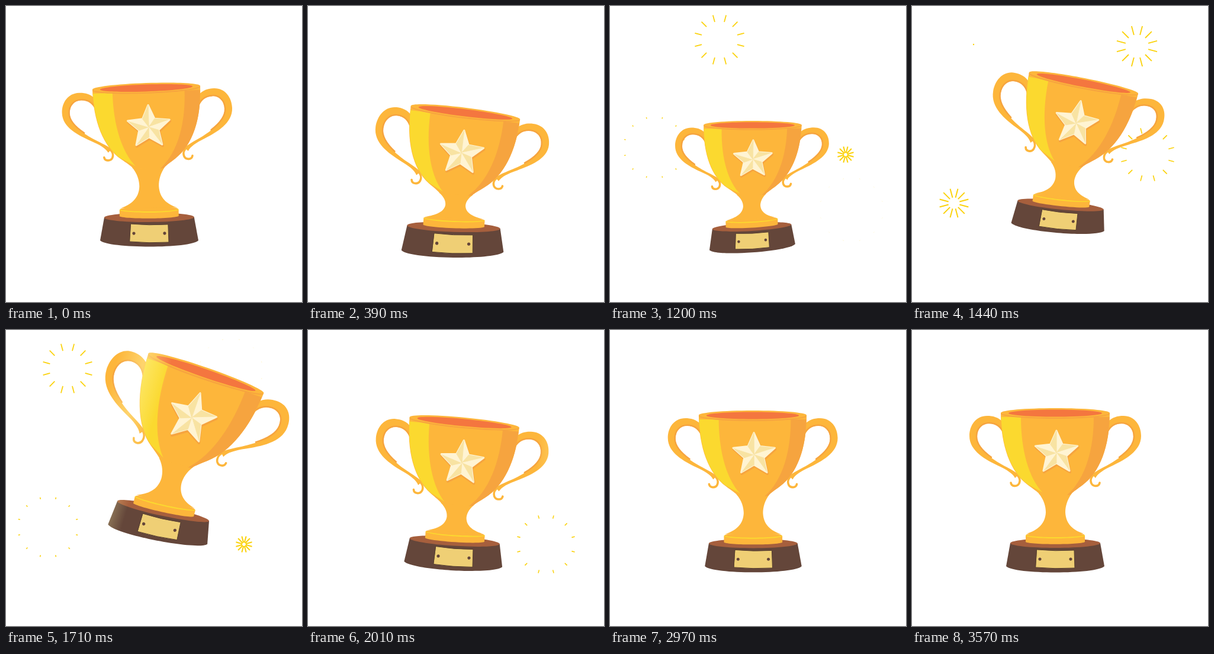
An HTML page with a canvas for the animation above (3.6 s loop, 500 by 500 pixels).

```html
<!DOCTYPE html>
<html lang="en">
<head>
<meta charset="utf-8">
<title>Trophy</title>
<style>
  html, body { margin: 0; width: 100%; height: 100%; overflow: hidden; background: #fff; }
  canvas { display: block; width: 500px; height: 500px; }
</style>
</head>
<body>
<canvas id="stage" width="500" height="500"></canvas>
<script>
const ctx = document.getElementById('stage').getContext('2d');
const LOOP = 3600, STEP = 30, RAD = Math.PI / 180;
const GOLD = '#fdb63b', SHADE = '#f6a43f', YELLOW = '#fbd92f', RED = '#f4763f';
const WOOD = '#64463a', WOOD_TOP = '#a65f3d', PLATE = '#efcf75';
const CREAM = '#fff4d3', CREAM_DARK = '#f8e3a2', SPARK = '#fbd20c';

// time, base x, base y, base angle, base scale, rim x, rim y, rim angle, rim scale
const POSES = [
  [0, 242, 397, 0, 1, 237, 138, -2, .99],
  [120, 241, 397, -1, 1, 231, 135, -4, .99],
  [390, 244, 415, 1, 1.04, 266, 180, 7, 1.01],
  [540, 240, 399, -3, 1, 224, 142, -6, 1],
  [750, 217.5, 350, -8.4, .99, 160, 84, -14.6, 1.055],
  [840, 209, 333, -9, 1, 150, 66, -15, 1.06],
  [1080, 230, 391, -7, .93, 212, 158, -8, .96],
  [1200, 240.5, 408, -4, .875, 241, 201, 0, .9],
  [1440, 246, 374, 5, .95, 290, 130, 11, 1.02],
  [1710, 256, 346, 11.2, 1.03, 338, 73, 19, 1.12],
  [1950, 248, 385, 6, 1, 285, 135, 9, 1.04],
  [2100, 242, 408, 0, 1, 240, 178, 1, .98],
  [2370, 241, 402, -.6, 1, 234.5, 155, -1.9, 1.005],
  [2700, 242, 399, 0, 1, 243, 131, .5, .99],
  [2970, 242, 400, 0, .985, 241, 144, 0, .99],
  [3570, 242, 400, 0, 1, 242, 140, 0, 1]
];

// start time, x, y
const BURSTS = [
  [720, 408, 344], [780, 75, 239], [925, 185, 57], [1130, 398, 251],
  [1235, 380, 68], [1305, 71, 333], [1437, 104, 65], [1640, 402, 362]
];
const BURST_TIME = 500, BURST_RADIUS = 54;
const SHINE = { from: 1620, to: 2040 };

const lerp = (a, b, t) => a + (b - a) * t;

// Monotone cubic interpolation of every pose column
function poseAt(time) {
  const last = POSES.length - 1;
  const i = Math.max(0, POSES.findLastIndex(p => p[0] <= time));
  if (i === last) return POSES[last];
  const rate = (n, c) => (POSES[n + 1][c] - POSES[n][c]) / (POSES[n + 1][0] - POSES[n][0]);
  const slope = (n, c) => {
    if (n === 0 || n === last) return 0;
    const a = rate(n - 1, c), b = rate(n, c);
    return a * b <= 0 ? 0 : 2 * a * b / (a + b);
  };
  const p = POSES[i], q = POSES[i + 1], span = q[0] - p[0], u = (time - p[0]) / span;
  return p.map((v, c) => {
    const d = q[c] - v, m = slope(i, c) * span, n = slope(i + 1, c) * span;
    return v + u * (m + u * (3 * d - 2 * m - n + u * (m + n - 2 * d)));
  });
}

// Bends the upright trophy (x from its axis, y from 140 rim to 400 foot) along a spine
function makeWarp([, bx, by, a0, s0, rx, ry, a1, s1]) {
  const dx = rx - bx, dy = ry - by, len = Math.hypot(dx, dy), tilt = Math.atan2(dx, -dy);
  const tall = 1 + 1.4 * (s1 - 1);
  const low = 53 * s0 / len, high = 1 - 137 * tall / len;
  const bow = -len * (a1 - a0) * RAD / 2;
  const along = y => y > 347 ? (400 - y) * s0 / len
    : y > 277 ? lerp(low, high, (347 - y) / 70)
    : 1 - (y - 140) * tall / len;
  const warp = (x, y) => {
    const t = along(y), a = lerp(a0, a1, t) * RAD, r = x * lerp(s0, s1, t), b = bow * t * (1 - t);
    return [bx + dx * t + b * Math.cos(tilt) + r * Math.cos(a),
            by + dy * t + b * Math.sin(tilt) + r * Math.sin(a)];
  };
  return { warp, tilt, bx, by };
}

const PAIR = /(-?[\d.]+),(-?[\d.]+)/g;
const mirror = d => d.replace(PAIR, (_, x, y) => `${-x},${y}`);

function ellipse(y, rx, ry, x = 0) {
  const k = .5523, a = rx * k, b = ry * k, l = x - rx, r = x + rx;
  return `M${l},${y} C${l},${y - b} ${x - a},${y - ry} ${x},${y - ry} C${x + a},${y - ry} ${r},${y - b} ${r},${y}` +
    ` C${r},${y + b} ${x + a},${y + ry} ${x},${y + ry} C${x - a},${y + ry} ${l},${y + b} ${l},${y} Z`;
}

function starPoint(i, dx = 0, dy = 0) {
  const a = i * 36 * RAD, r = i % 2 ? 17.5 : 37.5;
  return `${(2 + dx + r * Math.sin(a)).toFixed(2)},${(207.5 + dy - r * Math.cos(a)).toFixed(2)}`;
}
const starPath = (dx, dy) =>
  'M' + Array.from({ length: 10 }, (_, i) => starPoint(i, dx, dy)).join(' L') + ' Z';

const HANDLE = 'M-88,156 C-96,147 -106,145 -115,145 C-134,145 -145,161 -145,179 C-145,205 -117,219 -97,229' +
  ' C-82,236 -72,242 -68,250 L-62,244 C-72,236 -84,231 -94,225 C-112,214 -132,200 -132,180' +
  ' C-132,166 -123,158 -112,158 C-100,158 -92,164 -86,180 Z';
const HANDLE_EDGE = 'M-108,215 C-122,205 -133,194 -133,180 C-133,165 -123,157 -112,157 C-100,157 -92,163 -87,174';
const CURL = 'M-72,240 C-62,245 -58,252 -61,259 C-64,265 -74,265 -75,258';
const BODY = 'M-92,140 C-92,195 -76,240 -46,262 C-38,268 -30,273 -26,278 L26,278' +
  ' C30,273 38,268 46,262 C76,240 92,195 92,140 Z';
const LIGHT = 'M-91.5,147 C-90,196 -75,240 -46,261 L-22,274 C-44,250 -58,205 -58,147 Z';
const DARK = 'M65,147 C65,200 52,250 20,279 L26,278 C30,273 38,268 46,262 C76,240 91,196 91.5,147 Z';
const STEM = 'M-28,276 C-19,287 -16,298 -16,308 C-17,328 -30,338 -48,344 L48,344' +
  ' C30,338 18,328 17,308 C17,298 20,287 28,276 Z';
const FOOT = 'M-50,347 L-50,358 C-42,363 42,363 50,358 L50,347 Z';
const BLOCK = 'M-76,360 L-83,399 C-70,413 70,413 83,399 L76,360 Z';
const LABEL = 'M-31,371 Q0,374 32,372 L33,402 Q0,404 -33,401 Z';

function drawTrophy(warp) {
  const shape = d => new Path2D(d.replace(PAIR, (_, x, y) => warp(+x, +y).join(',')));
  const fill = (d, color) => { ctx.fillStyle = color; ctx.fill(shape(d)); };
  const line = (d, color, width) => {
    ctx.strokeStyle = color;
    ctx.lineWidth = width;
    ctx.stroke(shape(d));
  };
  ctx.lineCap = ctx.lineJoin = 'round';

  fill(BLOCK, WOOD);
  fill(ellipse(360, 76, 8), WOOD_TOP);
  fill(LABEL, PLATE);
  line(LABEL, '#57402f', 1);
  for (const x of [-26, 26]) fill(ellipse(387, 2.6, 2.6, x), WOOD);

  fill(FOOT, GOLD);
  fill(ellipse(347, 50, 5), YELLOW);
  fill(ellipse(346, 49, 4), GOLD);
  fill(STEM, GOLD);

  for (const side of [d => d, mirror]) {
    fill(side(HANDLE), GOLD);
    line(side(HANDLE_EDGE), SHADE, 2.5);
    line(side(CURL), GOLD, 3.6);
  }

  fill(BODY, GOLD);
  fill(LIGHT, YELLOW);
  fill(DARK, SHADE);
  fill(ellipse(141.5, 92, 8.5), SHADE);
  fill(ellipse(140, 92, 8), GOLD);
  fill(ellipse(140.5, 79, 6), RED);

  const shadow = starPath(1, 2.5), star = starPath(0, 0);
  fill(shadow, SHADE);
  line(shadow, SHADE, 4);
  fill(star, CREAM);
  line(star, CREAM, 3);
  for (let i = 0; i < 10; i++) {
    const color = i % 2 ? CREAM_DARK : CREAM;
    const facet = `M2,207.5 L${starPoint(i)} L${starPoint(i + 1)} Z`;
    fill(facet, color);
    line(facet, color, .8);
  }
}

function drawShine(time, { tilt, bx, by }) {
  const p = (time - SHINE.from) / (SHINE.to - SHINE.from);
  if (p <= 0 || p >= 1) return;
  const x = lerp(-190, 200, p), g = ctx.createLinearGradient(x - 45, 0, x + 45, 0);
  g.addColorStop(0, 'rgba(255,248,170,0)');
  g.addColorStop(.5, 'rgba(255,248,170,.45)');
  g.addColorStop(1, 'rgba(255,248,170,0)');
  ctx.save();
  ctx.globalCompositeOperation = 'source-atop';
  ctx.translate(bx, by);
  ctx.rotate(tilt);
  ctx.fillStyle = g;
  ctx.fillRect(x - 45, -400, 90, 500);
  ctx.restore();
}

function drawBurst(time, [start, x, y]) {
  const p = (time - start) / BURST_TIME;
  if (p <= 0 || p >= 1) return;
  const outer = BURST_RADIUS * (1 - (1 - p) ** 2);
  const inner = BURST_RADIUS * p * p * (3 - 2 * p);
  ctx.lineCap = 'butt';
  ctx.strokeStyle = SPARK;
  ctx.lineWidth = lerp(2.2, 1.4, p);
  ctx.beginPath();
  for (let i = 0; i < 12; i++) {
    const a = (15 + 30 * i) * RAD, c = Math.cos(a), s = Math.sin(a);
    ctx.moveTo(x + inner * c, y + inner * s);
    ctx.lineTo(x + outer * c, y + outer * s);
  }
  ctx.stroke();
}

function draw(ms) {
  const time = Math.floor(ms % LOOP / STEP) * STEP;
  const pose = makeWarp(poseAt(time));
  ctx.clearRect(0, 0, 500, 500);
  drawTrophy(pose.warp);
  drawShine(time, pose);
  ctx.globalCompositeOperation = 'destination-over';
  for (const burst of BURSTS) drawBurst(time, burst);
  ctx.globalCompositeOperation = 'source-over';
}

const begin = performance.now();
function tick() {
  draw(performance.now() - begin);
  requestAnimationFrame(tick);
}
tick();
</script>
</body>
</html>
```
